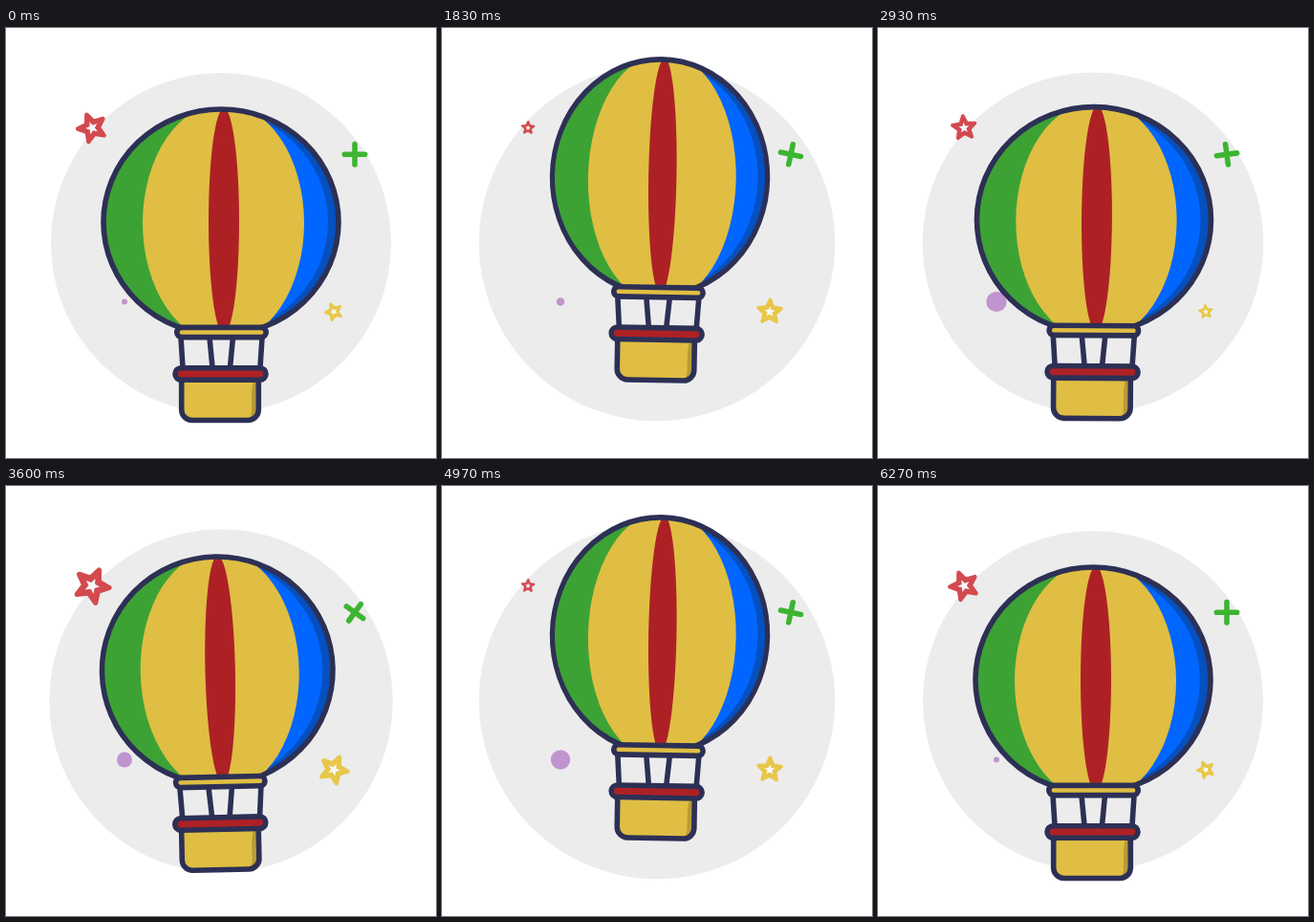
Animation of 450 by 450 pixels, one loop 6310 ms. Source, as an HTML page:

```html
<!DOCTYPE html>
<html lang="en">
<head>
<meta charset="utf-8">
<title>Hot-air balloon</title>
<style>
  html, body { margin: 0; width: 100%; height: 100%; overflow: hidden; background: #fff; }
  svg { display: block; width: 100%; height: 100%; }
  .line { stroke: #2d3055; stroke-width: 5.6; stroke-linecap: round; stroke-linejoin: round; }
</style>
</head>
<body>
<svg viewBox="0 0 450 450">
  <defs>
    <clipPath id="skin"><ellipse cx="225" cy="203" rx="123" ry="118"/></clipPath>
    <clipPath id="box"><path id="boxShape" d="M183.7 366V399.5a11 11 0 0 0 11 11H253.3a11 11 0 0 0 11-11V366Z"/></clipPath>
  </defs>

  <circle id="disc" cx="225" cy="225" fill="#ececec"/>
  <circle id="dot" cx="124" cy="286.5" fill="#c095cf"/>
  <g id="redStar" fill="#d34a4f" stroke="#d34a4f"></g>
  <g id="goldStar" fill="#e7c74a" stroke="#e7c74a"></g>
  <path id="plus" d="M-10.7 0H10.7M0-10.7V10.7" stroke="#3cb531" stroke-width="5.6" stroke-linecap="round"/>

  <g id="balloon">
    <g id="envelope">
      <g clip-path="url(#skin)">
        <rect x="225" y="80" width="130" height="245" fill="#0450c0"/>
        <ellipse cx="214" cy="203" rx="123" ry="118" fill="#06f"/>
        <rect x="95" y="80" width="130" height="245" fill="#3da234"/>
        <ellipse cx="227.5" cy="204" rx="84.5" ry="125" fill="#dfbe43"/>
        <ellipse cx="228" cy="202" rx="16" ry="118" fill="#ad2125"/>
      </g>
      <ellipse class="line" cx="225" cy="203" rx="123" ry="118" fill="none"/>
    </g>
    <path class="line" fill="none" d="M183 324L185 355M268 324L266 355M213 324L216 355M237.5 324L234.5 355"/>
    <use href="#boxShape" fill="#dfbe43"/>
    <path d="M261 366Q257 372 257 386V402Q257 408 251 411H270V366Z" fill="#b79b38" clip-path="url(#box)"/>
    <use href="#boxShape" class="line" fill="none"/>
    <rect class="line" x="178.8" y="313.4" width="93.4" height="10.2" rx="5" fill="#dfbe43"/>
    <rect class="line" x="177" y="355.7" width="95" height="12.6" rx="6.3" fill="#ad2125"/>
  </g>
</svg>

<script>
const LOOP = 6310, MOTION = 6280, CYCLE = MOTION / 2;
const $ = id => document.getElementById(id);
const ease = x => (1 - Math.cos(Math.PI * x)) / 2;
const swing = turns => ease(2 * turns);
const wave = turns => Math.cos(2 * Math.PI * turns);

function starPath(radius, innerRadius) {
  const points = Array.from({ length: 10 }, (_, i) => {
    const r = i % 2 ? innerRadius : radius, a = i * Math.PI / 5;
    return `${(r * Math.sin(a)).toFixed(3)} ${(-r * Math.cos(a)).toFixed(3)}`;
  });
  return `M${points.join("L")}Z`;
}

for (const id of ["redStar", "goldStar"]) {
  $(id).innerHTML =
    `<path d="${starPath(0.87, 0.4)}" stroke-width=".26" stroke-linejoin="round"/>` +
    `<path d="${starPath(0.4, 0.17)}" fill="#f8f8f8" stroke="none"/>`;
}

function place(id, x, y, angle, scale = 1) {
  $(id).setAttribute("transform", `translate(${x} ${y}) rotate(${angle}) scale(${scale})`);
}

function tilt(p) {
  if (p < 0.25) return -2 * ease(4 * p);
  if (p < 0.75) return -2 + 4 * ease(2 * p - 0.5);
  return 2 - 2 * ease(4 * p - 3);
}

function draw(now) {
  const t = Math.min(now % LOOP, MOTION);
  const p = t / CYCLE % 1;
  const lift = swing(p);

  $("disc").setAttribute("r", 178 + 8.9 * lift);
  $("dot").setAttribute("r", 3 + 8.4 * swing(3 * t / MOTION));

  const wiggle = 2 - 24 * wave(3 * p);
  place("redStar", 90, 104.5, wiggle, 13.7 + 7.1 * wave(p - 0.17));
  place("goldStar", 343, 297, wiggle, 14.2 + 7.4 * wave(p - 0.34));
  place("plus", 365, 132.3, 180 * ease(2 * p % 1));

  $("balloon").setAttribute("transform",
    `translate(0 ${-45 * lift}) rotate(${tilt(p)} 225 372)`);
  $("envelope").setAttribute("transform",
    `translate(225 318) scale(${1 - 0.09 * lift} ${1 + 0.047 * lift}) translate(-225 -318)`);
}

const start = performance.now();
function frame() {
  draw(performance.now() - start);
  requestAnimationFrame(frame);
}
frame();
</script>
</body>
</html>
```
